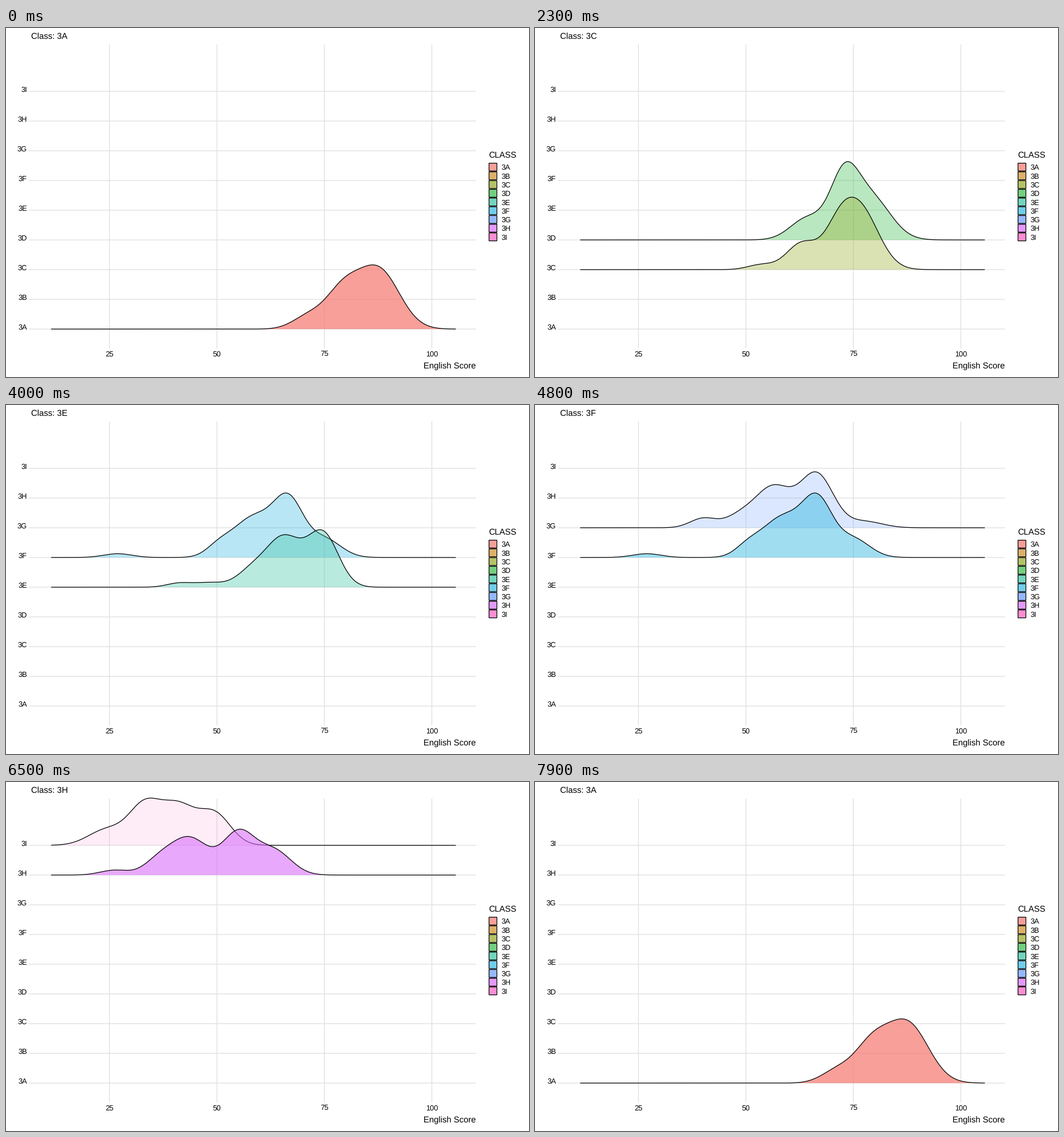
Recreate the animation shown at these times as a matplotlib script. Size 917 by 611 pixels, loop 8000 ms.

```python
import numpy as np
import matplotlib.pyplot as plt
from matplotlib.animation import FuncAnimation
from matplotlib.patches import Rectangle

W, H, DPI = 917, 611, 64
PT = 72 / DPI  # points per pixel
FRAMES, INTERVAL = 80, 100
HOLD, FADE = 3, 6  # steps a class rests, steps of a cross-fade
ALPHA = 0.7
GRID = "#dfdfdf"
plt.rcParams["text.hinting"] = "none"

# class: fill, then its humps as (centre, spread, height) in pixels
CLASSES = {
    "3A": ("#f6776e", (654, 36, 102), (590, 31, 65), (528, 27, 20)),
    "3B": ("#cf9129", (626, 26, 119), (577, 33, 94)),
    "3C": ("#95a926", (569, 33, 106), (530, 25, 49), (468, 27, 46), (396, 23, 8.5)),
    "3D": ("#38bb49", (590, 34, 72), (542, 25, 104), (478, 30, 38)),
    "3E": ("#38c4a1", (556, 27, 92), (487, 31, 86), (430, 26, 26), (355, 28, 8),
           (302, 21, 6.5)),
    "3F": ("#34b8e3", (558, 29, 32), (496, 26, 91), (434, 37, 70), (372, 21, 15),
           (196, 25, 6.6)),
    "3G": ("#679afe", (578, 31, 11), (494, 29, 93), (418, 32, 71), (358, 26, 18),
           (295, 23, 16.5)),
    "3H": ("#d86dfa", (470, 30, 42), (408, 28, 73), (322, 33, 64), (268, 26, 23),
           (190, 25, 8.5)),
    "3I": ("#fb5ec1", (366, 28, 54), (302, 30, 66), (243, 28, 68), (176, 32, 27)),
}
NAMES = list(CLASSES)

fig = plt.figure(figsize=(W / DPI, H / DPI), dpi=DPI, facecolor="white")
ax = fig.add_axes([0, 0, 1, 1])
ax.set_xlim(0, W)
ax.set_ylim(H, 0)
ax.axis("off")


def baseline(i):
    return 527.1 - 52.03 * i


def label(x, y, text, size=12.9, ha="left"):
    return ax.text(x, y, text, fontsize=size * PT, family="Liberation Sans",
                   color="black", ha=ha, va="baseline")


def grid_line(xs, ys):
    ax.plot(xs, ys, color=GRID, lw=1.3 * PT, solid_capstyle="butt", snap=False, zorder=1)


def density(xs, humps):
    return sum(height * np.exp(-0.5 * ((xs - centre) / spread) ** 2)
               for centre, spread, height in humps)


def make_ridge(i, name):
    color, *humps = CLASSES[name]
    xs = np.linspace(79.2, 788.7, 512)
    base = baseline(i)
    ys = base - density(xs, humps)
    z = 30 - 2 * i  # lower ridges lie in front
    fill = ax.fill_between(xs, ys, base, facecolor=color, linewidth=0, zorder=z)
    line, = ax.plot(xs, ys, color="black", lw=1.25 * PT, solid_capstyle="butt",
                    snap=False, zorder=z + 1)
    return fill, line


def legend_key(mid, name):
    box = dict(xy=(846.9, mid - 6.9), width=13.8, height=13.8, snap=False)
    ax.add_patch(Rectangle(**box, facecolor=CLASSES[name][0], alpha=ALPHA, linewidth=0))
    ax.add_patch(Rectangle(**box, fill=False, edgecolor="black", lw=1.25 * PT))
    label(868.4, mid + 4.8, name)


for score in (25, 50, 75, 100):
    x = 181.4 + (score - 25) * 7.536
    grid_line([x, x], [29, 561])
    label(x, 574.6, str(score), ha="center")

for i, name in enumerate(NAMES):
    grid_line([40, 824], [baseline(i)] * 2)
    label(37, baseline(i) + 0.7, name, ha="right")
    legend_key(243.5 + 15.28 * i, name)

label(845.8, 227.2, "CLASS", 14.9)
label(824, 596, "English Score", 14.9, "right")
title = label(43.7, 20, "", 14.9)
ridges = [make_ridge(i, name) for i, name in enumerate(NAMES)]


def update(frame):
    # 81 steps are thinned to 80 frames, so the middle step is skipped
    step = frame + (frame >= FRAMES // 2)
    state, phase = divmod(step, HOLD + FADE)
    following = (state + 1) % len(NAMES)
    progress = max(0, phase - HOLD + 1) / FADE
    weights = {state: 1 - progress, following: progress}
    for i, (fill, line) in enumerate(ridges):
        weight = weights.get(i, 0)
        fill.set_visible(weight > 0)
        line.set_visible(weight > 0)
        fill.set_alpha(ALPHA * weight)
    title.set_text("Class: " + NAMES[following if progress > 0.5 else state])
    return [title]


anim = FuncAnimation(fig, update, frames=FRAMES, interval=INTERVAL,
                     repeat=True, repeat_delay=0, blit=False)
plt.show()
```
